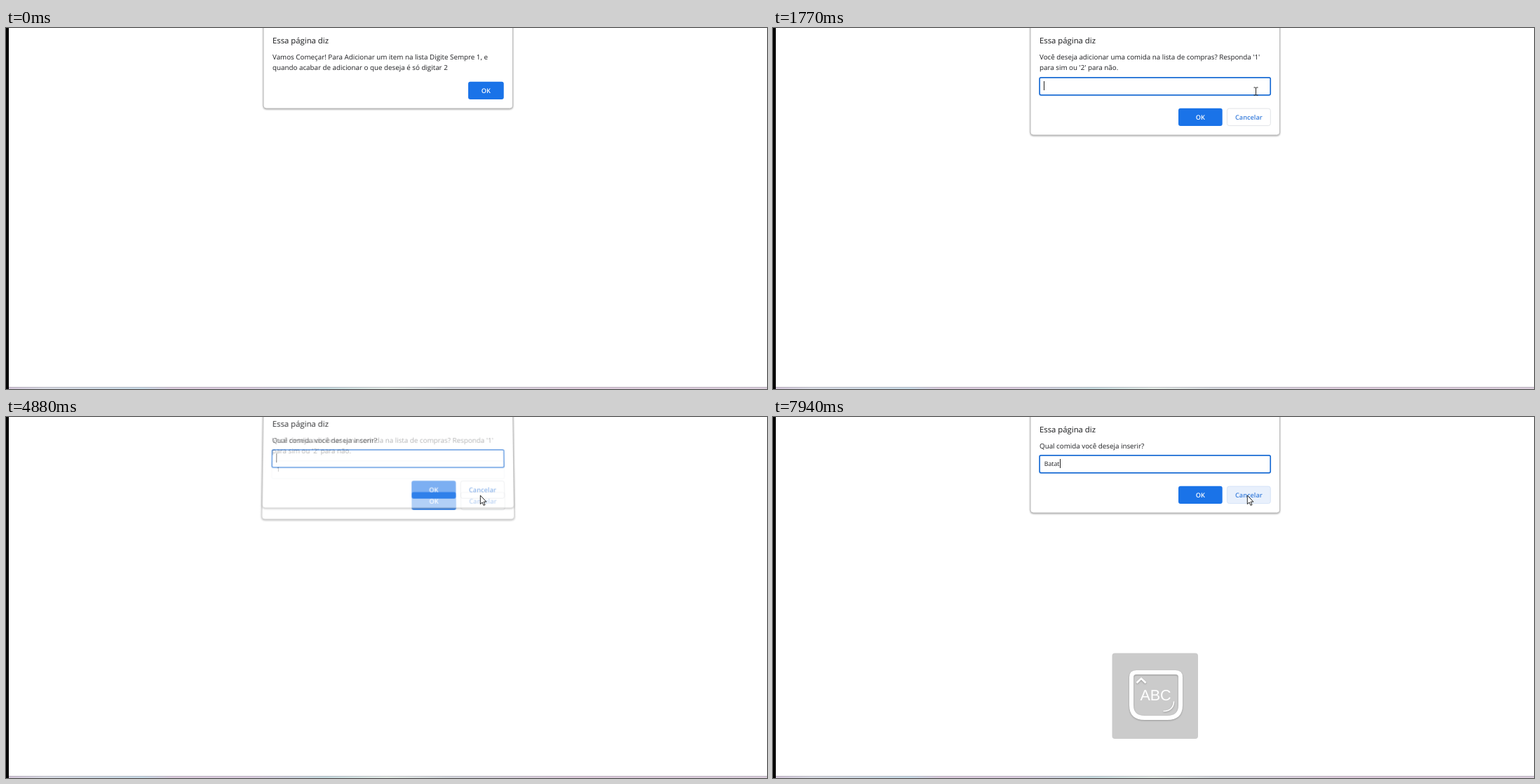
Write an HTML page that moves like this. It is 1085x516 px and loops after 8000 ms.

```html
<!DOCTYPE html>
<html lang="pt-BR">
<head>
<meta charset="utf-8">
<title>Lista de compras</title>
<style>
  html, body { margin: 0; width: 100%; height: 100%; overflow: hidden; background: #fff; }
  svg { position: absolute; left: 0; top: 0; width: 1085px; height: 516px; overflow: visible; }
  .dialog { transform-origin: 544.5px 0; }
  text { font-family: "Open Sans", "Noto Sans", sans-serif; font-size: 9.8px; fill: #1d1e21; text-rendering: geometricPrecision; }
  .title { font-size: 11.33px; fill: #161719; }
  .label { font-size: 9.2px; font-weight: 600; text-anchor: middle; }
  .typed { font-size: 8.8px; }
  .frame { fill: #fff; stroke: #bcbcbc; filter: drop-shadow(0 1px 1.2px rgba(0, 0, 0, .34)); }
  .abc { font: 21.5px "Liberation Sans", Arial, sans-serif; fill: #fff; text-anchor: middle; }
  .key { filter: drop-shadow(0 1px 1px rgba(0, 0, 0, .25)); }
</style>
</head>
<body>
<div id="stage"></div>
<script>
const W = 1085, H = 516, LOOP = 8000;
const stage = document.getElementById('stage');
const clamp = v => Math.max(0, Math.min(1, v));

function layer(html, cls = '') {
  stage.insertAdjacentHTML('beforeend', `<svg class="${cls}" viewBox="0 0 ${W} ${H}">${html}</svg>`);
  return stage.lastElementChild;
}

const line = (s, y, cls = '') => `<text class="${cls}" x="380" y="${y}">${s}</text>`;

function button(x, y, w, s, main) {
  const box = main
    ? `<rect x="${x}" y="${y}" width="${w}" height="25.3" rx="3" fill="#1a73e8"/>`
    : `<rect class="plain" x="${x + .4}" y="${y + .4}" width="${w - .8}" height="24.5" rx="3" stroke-width=".8"/>`;
  return `${box}<text class="label" x="${x + w / 2}" y="${y + 15.8}" style="fill:${main ? '#fff' : '#3b7fdc'}">${s}</text>`;
}

function dialog(bottom, lines, body) {
  return layer(`<rect class="frame" x="367" y="-20" width="355.5" height="${bottom + 20}" rx="4"/>
    ${line('Essa página diz', 22, 'title')}
    ${lines.map((s, i) => line(s, 44.5 + 15.8 * i)).join('')}${body}`, 'dialog');
}

function prompt(lines, dy) {
  const el = dialog(153 + dy, lines, `<g transform="translate(0 ${dy})">
    <rect class="field" x="380.1" y="70.8" width="329.1" height="25" rx="2" fill="#fff"/>
    <text class="typed" x="386.7" y="86.3"></text>
    <rect class="caret" y="76" width="1" height="13" fill="#222"/>
    ${button(578, 114.7, 62.7, 'OK', true)}${button(647, 114.7, 62.7, 'Cancelar', false)}</g>`);
  const find = c => el.querySelector(c);
  return { el, field: find('.field'), typed: find('.typed'), caret: find('.caret'), cancel: find('.plain') };
}

layer(`<defs><linearGradient id="strip">
    <stop offset="0" stop-color="#d5c6da"/><stop offset=".05" stop-color="#d9dbe4"/>
    <stop offset=".18" stop-color="#c9dbe8"/><stop offset=".22" stop-color="#dccbdd"/>
    <stop offset=".32" stop-color="#dccde0"/><stop offset=".42" stop-color="#c8dde2"/>
    <stop offset=".5" stop-color="#e6eee9"/><stop offset=".58" stop-color="#d6d9df"/>
    <stop offset=".75" stop-color="#decbdc"/><stop offset="1" stop-color="#dccfdd"/>
  </linearGradient></defs>
  <rect y="513" width="${W}" height="3" fill="url(#strip)"/>
  <rect y="513" width="${W}" height="1" fill="#8c8894" opacity=".45"/>
  <rect width="4" height="${H}" fill="#000"/>`);

const alertBox = dialog(115,
  ['Vamos Começar! Para Adicionar um item na lista Digite Sempre 1, e',
   'quando acabar de adicionar o que deseja é só digitar 2'],
  button(659, 76.7, 50.7, 'OK', true));
const choice = prompt(
  ["Você deseja adicionar uma comida na lista de compras? Responda '1'",
   "para sim ou '2' para não."], 0);
const food = prompt(['Qual comida você deseja inserir?'], -16);

const caps = layer(`<rect x="483.5" y="337.5" width="122.5" height="122.5" rx="4" fill="#cbcbcb"/>
  <g class="key" fill="none" stroke="#fff">
    <path d="M518 365H574Q581 365 581 372V412Q581 430 562 430H530Q511 430 511 412V372Q511 365 518 365Z" stroke-width="6"/>
    <path d="M518.5 380L525 373.8L531.5 380" stroke-width="2.6"/>
    <path d="M556.5 420.5Q571 420 571.5 406.5" stroke-width="1.6"/>
  </g>
  <text class="abc" x="545.5" y="405.3">ABC</text>`);

const pointer = layer(`<g id="arrow"><path d="M.5 .5V13L3.3 10.4L5.2 14.8L7.2 14L5.3 9.7H9.1Z" fill="#fff" stroke="#111" stroke-width=".9"/></g>
  <path id="beam" d="M-3 -5.5H-.8L0 -5L.8 -5.5H3M0 -5V5M-3 5.5H-.8L0 5L.8 5.5H3" fill="none" stroke="#222"/>`);
const arrow = pointer.querySelector('#arrow'), beam = pointer.querySelector('#beam');

// The screen refreshes on these grids: [start, step]
const grids = [[0, 250], [250, 69.1], [1080, 200], [1280, 70], [1770, 130], [1900, 70],
  [2040, 130], [2170, 70], [2240, 10], [4810, 70], [5160, 10]];

function snap(t) {
  const [start, step] = grids.filter(g => g[0] <= t).pop();
  return start + Math.floor((t - start) / step) * step;
}

// Windows tilt and fade while they open and close
function pose(el, t, open, close) {
  const e = 1 - (1 - clamp((t - open) / 240)) ** 2;
  const q = clamp((t - close + 20) / 200);
  const alpha = e ** .8 * (1 - q * q);
  const dy = -16 * (1 - e) - 18 * q;
  const tilt = 8 * (1 - e) + 5 * Math.min(1, q / .45);
  el.style.display = alpha > .001 ? '' : 'none';
  el.style.opacity = alpha;
  el.style.transform = tilt ? `perspective(1000px) translateY(${dy}px) rotateX(${tilt}deg)` : 'none';
}

const caretX = [386, 392, 397, 401, 405, 409];
const within = (t, spans) => spans.some(([a, b]) => t >= a && t < b);

function fill(p, t, text, keys, lit, focused, hover) {
  const n = keys.filter(k => k <= t).length;
  p.typed.textContent = text.slice(0, n);
  p.caret.setAttribute('x', caretX[n]);
  p.caret.style.display = within(t, lit) ? '' : 'none';
  p.field.setAttribute('stroke', focused ? '#1a6cd4' : '#e4e6ea');
  p.field.setAttribute('stroke-width', focused ? 1.7 : .8);
  p.cancel.setAttribute('fill', hover ? '#e8f0fc' : '#fff');
  p.cancel.setAttribute('stroke', hover ? '#cfdff6' : '#dadce0');
}

const bezier = (u, a, b, c, d) =>
  a * (1 - u) ** 3 + 3 * b * u * (1 - u) ** 2 + 3 * c * u * u * (1 - u) + d * u ** 3;

const stops = [[1080, 675.5, 74], [1490, 675.5, 74], [1770, 688.5, 90.5], [1900, 686, 96],
  [2040, 677, 107], [2240, 675.8, 111.5], [LOOP, 675.8, 111.5]];

function pointerAt(t) {
  if (t < 1080) {
    const u = clamp((t - 250) / 760);
    return [bezier(u, 300, 760, 1050, 717), bezier(u, 453, 430, 260, 98)];
  }
  const i = stops.findIndex(s => s[0] > t);
  const [t0, x0, y0] = stops[i - 1], [t1, x1, y1] = stops[i];
  const u = (t - t0) / (t1 - t0);
  return [x0 + (x1 - x0) * u, y0 + (y1 - y0) * u];
}

function draw(time) {
  const t = snap(time);
  pose(alertBox, t, -1000, 1280);
  pose(choice.el, t, 1280, 4810);
  pose(food.el, t, 4810, LOOP + 1000);
  fill(choice, t, '1', [3890], [[1280, 2170], [2640, 3230], [3690, 4420]], t < 4810, false);
  fill(food, t, 'Batat', [6410, 6690, 6950, 7210, 7480], [[4810, 5350], [5880, LOOP]], true, t >= 4950);

  const [x, y] = pointerAt(t);
  const overField = t > 1490 && t < 2240 && y < 97;
  pointer.style.display = t < 250 ? 'none' : '';
  arrow.style.display = overField ? 'none' : '';
  beam.style.display = overField ? '' : 'none';
  for (const el of [arrow, beam]) el.setAttribute('transform', `translate(${x} ${y})`);
  caps.style.display = t >= 7940 ? '' : 'none';
}

const begin = performance.now();
function tick() {
  draw((performance.now() - begin) % LOOP);
  requestAnimationFrame(tick);
}
tick();
</script>
</body>
</html>
```
